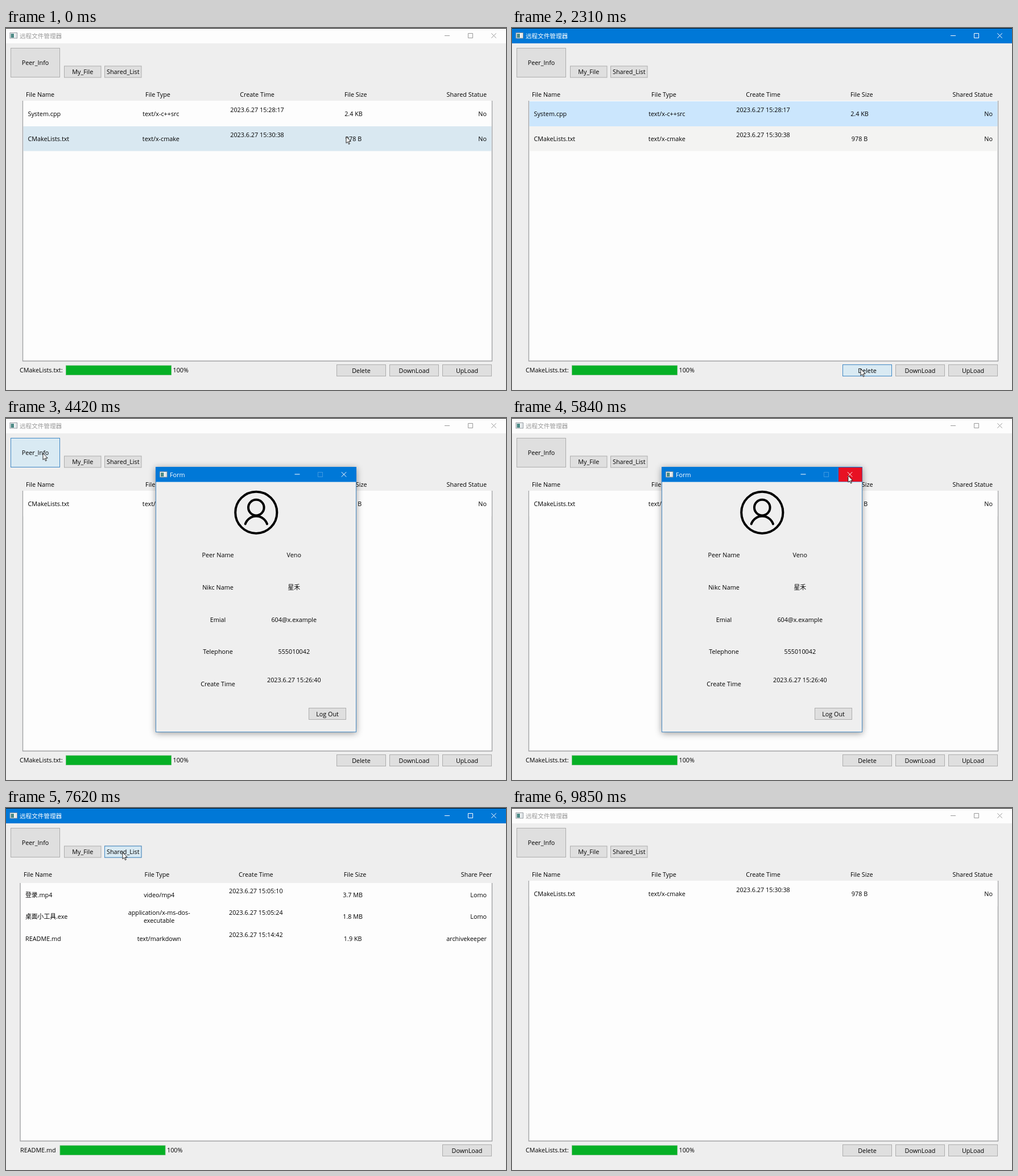
Recreate the animation shown at these times as an HTML page. Size 879x637 px, loop 9.93 s.

```html
<!DOCTYPE html>
<html lang="zh">
<head>
<meta charset="utf-8">
<style>
html, body { margin: 0; width: 100%; height: 100%; overflow: hidden; background: #eee; }
svg { display: block; width: 879px; height: 637px; }
text { font: 10.8px "Open Sans", "Noto Sans CJK SC", "Noto Sans CJK", sans-serif; fill: #000; white-space: pre; }
.cjk { font: 10.6px "Noto Sans CJK SC", "Noto Sans CJK", sans-serif; }
.bar text { fill: #fff; }
.bar path { stroke: #fff; fill: none; }
#title.off text { fill: #999; }
#title.off path { stroke: #999; }
.btn rect { fill: #dfdfdf; stroke: #adadad; }
.btn rect.hot { fill: #d9eaf3; stroke: #3f87c4; }
.window { filter: drop-shadow(0 2px 6px #0006); }
</style>
</head>
<body>
<svg id="stage" viewBox="0 0 879 637"></svg>
<script>
const stage = document.getElementById('stage');
const $ = id => document.getElementById(id);

// ---- drawing helpers: every text is placed by its vertical middle ----
const text = (x, y, s, anchor = 'start', attrs = '') =>
  `<text x="${x}" y="${y + 4}" text-anchor="${anchor}" ${attrs}>${s}</text>`;
const mid = (x, y, s) => text(x, y, s, 'middle');
const end = (x, y, s) => text(x, y, s, 'end');
const rect = (x, y, w, h, fill, attrs = '') =>
  `<rect x="${x}" y="${y}" width="${w}" height="${h}" fill="${fill}" ${attrs}/>`;
const group = (id, body, attrs = '') => `<g id="${id}" ${attrs}>${body}</g>`;

function button(x, y, w, h, label) {
  const box = `x="${x + .5}" y="${y + .5}" width="${w}" height="${h}"`;
  return `<g class="btn"><rect ${box}/><rect class="hot" ${box} opacity="0"/></g>` +
    mid(x + w / 2 + .5, y + h / 2 + .5, label);
}
const icon = (x, y, s = 1) => `<g transform="translate(${x} ${y}) scale(${s})">` +
  rect(.5, .5, 12.5, 9.5, '#fff', 'stroke="#8b9299"') + rect(2, 2, 5.5, 7, '#4d8a86') +
  rect(9, 2, 3, 7, '#dfe5e8') + '</g>';
const cross = (x, y, r) => `<path d="M${x - r} ${y - r}l${2 * r} ${2 * r}m0 ${-2 * r}l${-2 * r} ${2 * r}"/>`;
const dash = (x, y) => `<path d="M${x - 4.5} ${y + .5}h9"/>`;
const square = (x, y, attrs = '') => `<path d="M${x - 4} ${y - 4}h8v8h-8z" ${attrs}/>`;

const headers = (names, x, right) => text(x[0], 117, names[0]) +
  names.slice(1, 4).map((n, i) => mid(x[i + 1], 117, n)).join('') + end(right, 117, names[4]);
const row = (x, y, [name, type, date, size, last]) => {
  const lines = type.split('|');
  return text(x[0], y, name) + mid(x[2], y - 7, date) + mid(x[3], y, size) + end(845, y, last) +
    lines.map((s, i) => mid(x[1], y + (lines.length > 1 ? i * 14 - 7 : 0), s)).join('');
};
const frame = (x, y) => rect(x, y, 855 - x, 586 - y, '#fdfdfd') +
  `<path d="M${x} ${y}V586H854.5V${y}" fill="none" stroke="#a2a3a5" stroke-width="1.4"/>`;
const progress = (x, label, bar) => text(x, 602, label) +
  rect(bar + .5, 594, 185, 16.5, '#06b025', 'stroke="#55b865" stroke-width=".8"') +
  text(bar + 188.5, 602, '100%');

// ---- pages ----
const fileX = [38.5, 272.3, 441.5, 611];
const sharedX = [34, 269.2, 439.3, 609.7];

const filePage =
  headers(['File Name', 'File Type', 'Create Time', 'File Size', 'Shared Statue'], [35, 267, 441.5, 614.8], 845) +
  frame(29.5, 128) +
  rect(30.5, 129, 823, 44, '#fdfdfd', 'id="row0"') + rect(30.5, 173, 823, 43.5, '#f3f3f2', 'id="row1"') +
  group('first', row(fileX, 151, ['System.cpp', 'text/x-c++src', '2023.6.27 15:28:17', '2.4 KB', 'No'])) +
  group('second', row(fileX, 194.5, ['CMakeLists.txt', 'text/x-cmake', '2023.6.27 15:30:38', '978 B', 'No'])) +
  progress(24, 'CMakeLists.txt:', 105) +
  button(581, 592, 86, 20, 'Delete') + button(674, 592, 86, 20, 'DownLoad') + button(767, 592, 86, 20, 'UpLoad');

const sharedPage =
  headers(['File Name', 'File Type', 'Create Time', 'File Size', 'Share Peer'], [31, 265.5, 439.3, 613.5], 854.5) +
  frame(25, 132) +
  [0, 1, 2].map(i => rect(26, 133 + i * 38.5, 828, 38.5, 'none', `id="s${i}"`)).join('') +
  [['登录.mp4', 'video/mp4', '2023.6.27 15:05:10', '3.7 MB', 'Lomo'],
   ['桌面小工具.exe', 'application/x-ms-dos-|executable', '2023.6.27 15:05:24', '1.8 MB', 'Lomo'],
   ['README.md', 'text/markdown', '2023.6.27 15:14:42', '1.9 KB', 'archivekeeper'],
  ].map((r, i) => row(sharedX, 152.5 + i * 38.5, r)).join('') +
  progress(25, 'README.md', 94.5) + button(767, 592, 86, 20, 'DownLoad');

// ---- pop-up windows ----
const dialog = rect(373, 257, 107, 104, '#0078d7') + rect(374, 280, 105, 42, '#fff') +
  rect(374, 322, 105, 38, '#f0f0f0') +
  `<g class="bar">${icon(376, 263.5, .9)}${text(393, 268, '成功', 'start', 'class="cjk"')}${cross(464, 268, 4)}</g>` +
  '<circle cx="397.3" cy="303" r="13.3" fill="#1580d5"/>' +
  '<path d="M397.3 295v2.2M397.3 299.5v11" stroke="#fff" stroke-width="1.8"/>' +
  text(427.5, 295.5, '删除成功', 'start', 'class="cjk"') +
  button(405, 330, 63, 19, 'OK') +
  rect(405.5, 330.8, 62.5, 18.2, 'none', 'stroke="#0078d7" stroke-width="1.7"');

const info = [['Peer Name', 'Veno'], ['Nikc Name', '星禾'], ['Emial', '604@x.example'],
  ['Telephone', '555010042'], ['Create Time', '2023.6.27 15:26:40']];
const form = rect(263.5, 86.5, 352, 466, '#efefef', 'stroke="#4a8cc4"') + rect(263, 86, 353, 26.5, '#0078d7') +
  rect(574, 87, 41.5, 25, '#e81123', 'id="closeHot"') +
  `<g class="bar">${icon(270, 94)}${text(288, 99.5, 'Form')}${dash(512, 98.5)}` +
  `${square(552.5, 99.5, 'opacity=".25"')}${cross(594, 99.3, 4.2)}</g>` +
  '<g fill="none" stroke="#000" stroke-width="4" stroke-linecap="round"><circle cx="439.8" cy="166.3" r="36.6"/>' +
  '<circle cx="439.8" cy="157.6" r="13.8"/><path d="M420.7 186.5A20.2 20.2 0 0 1 459 186.5"/></g>' +
  info.map(([k, v], i) => mid(372.5, 241 + i * 56.75, k) + mid(506.3, i < 4 ? 241 + i * 56.75 : 461, v)).join('') +
  button(532, 510, 65, 20, 'Log Out');

stage.innerHTML = rect(0, 0, 879, 637, '#eee') +
  group('title', rect(0, 0, 879, 27, '#fdfdfd', 'id="strip"') + icon(6.5, 8) +
    text(24, 13.5, '远程文件管理器', 'start', 'class="cjk"') +
    dash(775.5, 13) + square(816.5, 13.5) + cross(857.5, 13.5, 4.2), 'class="bar"') +
  rect(0, 0, 879, 1, '#111') +
  button(8, 35, 86, 51, 'Peer_Info') + button(102, 66.5, 64.5, 20, 'My_File') + button(173, 66.5, 64.5, 20, 'Shared_List') +
  group('files', filePage) + group('shared', sharedPage) +
  group('dialog', dialog, 'class="window"') + group('form', form, 'class="window"') +
  '<path id="cursor" d="M0 0V11.6L2.7 9.2 4.6 13.6 6.3 12.8 4.5 8.5H8.2Z" fill="#fff" stroke="#111" stroke-width=".9"/>';

const hot = [...document.querySelectorAll('.hot')].map(el =>
  [el, ['x', 'y', 'width', 'height'].map(a => +el.getAttribute(a))]);

// ---- motion ----
const LOOP = 9930;
// time, x, y of the pointer
const path = [[0, 598, 191], [40, 598, 191], [240, 594, 160], [700, 594, 160], [1500, 613, 600],
  [2450, 613, 600], [2960, 406, 375], [3040, 406, 375], [3300, 436, 341], [3560, 436, 341],
  [4150, 65, 62], [4580, 65, 62], [5390, 562, 106], [5590, 562, 106], [5900, 594, 101],
  [6290, 594, 101], [6650, 392, 175], [7200, 205, 78], [8200, 205, 78], [8400, 200, 80],
  [8700, 153, 84], [9000, 153, 84], [9270, 130, 645], [LOOP, 130, 645]];

const between = (t, a, b) => t >= a && t < b;
const ramp = (t, a, d) => Math.min(1, Math.max(0, (t - a) / d));
const inside = ([px, py], [x, y, w, h]) => px >= x && px <= x + w && py >= y && py <= y + h;

function pointer(t) {
  const i = Math.max(1, path.findIndex(p => p[0] > t));
  const [t0, x0, y0] = path[i - 1], [t1, x1, y1] = path[i];
  const p = ramp(t, t0, t1 - t0), k = p * p * (3 - 2 * p);
  return [x0 + (x1 - x0) * k, y0 + (y1 - y0) * k];
}
// hover colour fades over 100 ms
function hover(t, box) {
  let n = 0;
  for (let i = 0; i < 10; i++) n += inside(pointer(Math.max(0, t - i * 10)), box);
  return n / 10;
}
const show = (id, on) => $(id).setAttribute('display', on ? 'inline' : 'none');
const fade = (id, t, open, close) => {
  const o = ramp(t, open, 100) * (1 - ramp(t, close, 120));
  $(id).style.opacity = o;
  show(id, o > 0);
};

function draw(t) {
  const pos = pointer(t);
  const active = between(t, 600, 2450) || between(t, 3400, 4250) || between(t, 6290, 9850);
  const modal = between(t, 2450, 3400) || between(t, 4250, 6290);
  const shared = between(t, 7550, 8900);
  const deleted = t >= 2700;

  $('title').setAttribute('class', active ? 'bar' : 'bar off');
  $('strip').setAttribute('fill', active ? '#0078d7' : '#fdfdfd');
  show('files', !shared);
  show('shared', shared);
  show('first', !deleted);
  show('row1', !deleted);
  $('second').setAttribute('transform', deleted ? 'translate(0 -43.5)' : '');

  const over = (x, y, w, h) => !modal && inside(pos, [x, y, w, h]);
  const selected = between(t, 600, 2700);
  $('row0').setAttribute('fill', selected ? '#cbe6fd' : over(30, 128, 824, 44) ? '#d9e8f1' : '#fdfdfd');
  $('row1').setAttribute('fill', over(30, 173, 824, 43) ? '#d9e8f1' : '#f3f3f2');
  for (let i = 0; i < 3; i++)
    $('s' + i).setAttribute('fill', over(26, 133 + i * 38.5, 828, 38) ? '#d9e8f1' : 'none');

  hot.forEach(([el, box]) => el.setAttribute('opacity', hover(t, box)));
  $('closeHot').setAttribute('opacity', hover(t, [574, 87, 41, 25]));
  fade('dialog', t, 2917, 3400);
  fade('form', t, 4250, 6290);
  $('cursor').setAttribute('transform', `translate(${pos[0]} ${pos[1]})`);
}

const start = performance.now();
function tick() {
  draw((performance.now() - start) % LOOP);
  requestAnimationFrame(tick);
}
tick();
</script>
</body>
</html>
```
